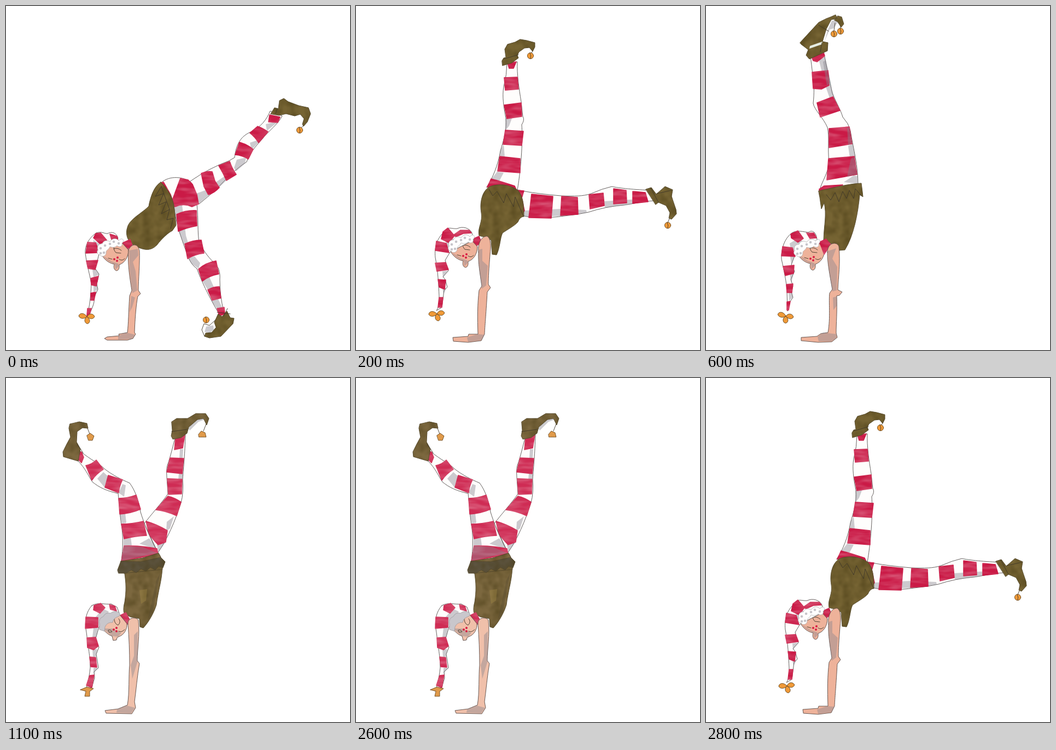
Animation of 629 by 629 pixels, one loop 3 s. Source, as an HTML page:

```html
<!DOCTYPE html>
<html lang="en">
<head>
<meta charset="utf-8">
<title>Elf handstand</title>
<style>
html, body { margin: 0; width: 100%; height: 100%; overflow: hidden; background: #fff; }
svg { display: block; width: 100%; height: 100%; }
path, circle { stroke-linejoin: round; stroke-linecap: round; }
.white { fill: #fefdfc; stroke: #55504f; stroke-width: .9; }
.red { fill: #ca1a46; stroke: #ca1a46; stroke-width: 1.6; filter: url(#streaks); }
.olive { fill: #766433; stroke: #574c31; stroke-width: .9; filter: url(#marker); }
.skin { fill: #eeb29a; stroke: #5b4c48; stroke-width: .9; }
.shade { fill: #85838e; fill-opacity: .42; }
.line { fill: none; stroke: #40382a; stroke-width: .9; }
.orange { fill: #f09a38; stroke: #6b4a20; stroke-width: .9; }
.pose { visibility: hidden; animation: 3s step-end infinite; }
#kick { animation-name: kick; }
#corner { animation-name: corner; }
#split { animation-name: split; }
#stand { animation-name: stand; }
#split .red { fill: #cf2c54; stroke: #cf2c54; }
#split .skin { fill: #f0c0aa; }
#split .olive { fill: #7c683f; }
#split .skirt { fill: #5d5440; }
#split .orange { fill: #e09a4a; }
@keyframes kick { 0% { visibility: visible } 6.666%, 100% { visibility: hidden } }
@keyframes corner {
  0% { visibility: hidden } 6.666% { visibility: visible }
  13.333% { visibility: hidden } 93.333%, 100% { visibility: visible }
}
@keyframes split {
  0% { visibility: hidden } 13.333% { visibility: visible } 20% { visibility: hidden }
  36.666% { visibility: visible } 53.333% { visibility: hidden }
  86.666% { visibility: visible } 93.333%, 100% { visibility: hidden }
}
@keyframes stand {
  0% { visibility: hidden } 20% { visibility: visible } 36.666% { visibility: hidden }
  53.333% { visibility: visible } 86.666%, 100% { visibility: hidden }
}
</style>
</head>
<body>
<svg viewBox="0 0 629 629">
<defs>
  <filter id="marker" x="-5%" y="-5%" width="110%" height="110%" color-interpolation-filters="sRGB">
    <feTurbulence type="fractalNoise" baseFrequency=".06" numOctaves="2" seed="4"/>
    <feColorMatrix values="0 0 0 0 .28  0 0 0 0 .23  0 0 0 0 .08  1 0 0 0 -.3"/>
    <feComposite in2="SourceGraphic" operator="in" result="mottle"/>
    <feMerge><feMergeNode in="SourceGraphic"/><feMergeNode in="mottle"/></feMerge>
  </filter>
  <filter id="streaks" x="-5%" y="-5%" width="110%" height="110%" color-interpolation-filters="sRGB">
    <feTurbulence type="fractalNoise" baseFrequency=".03 .12" numOctaves="2" seed="7"/>
    <feColorMatrix values="0 0 0 0 1  0 0 0 0 1  0 0 0 0 1  .5 0 0 0 -.18"/>
    <feComposite in2="SourceGraphic" operator="in" result="pale"/>
    <feMerge><feMergeNode in="SourceGraphic"/><feMergeNode in="pale"/></feMerge>
  </filter>
  <g id="bell">
    <circle class="orange" r="5.6"/>
    <path class="line" d="M-1-5Q2 0 0 5"/>
  </g>
  <g id="pom">
    <path class="orange" d="M0 0C-5-8-14-7-15-1C-12 5-4 4 0 0C4-7 12-6 14 0C11 6 4 4 0 0C-6 4-5 12 1 13C7 11 6 4 0 0Z"/>
  </g>
  <g id="face">
    <path class="red" d="M211 434L227 427L231 438L219 447Z"/>
    <path class="skin" d="M175 455C181 466 191 471 198 472C196 478 198 484 203 484C208 482 207 475 207 473C217 470 224 459 224 446L213 434L190 437Z"/>
    <path class="shade" d="M178 457C184 466 195 470 199 472L200 482L207 475L205 471L193 467Z"/>
    <path class="line" d="M197 444Q204 441 211 447M187 461L194 463M207 463Q212 467 217 462M198 436Q195 445 201 451L210 452"/>
    <g fill="#d81f43"><circle cx="198" cy="463" r="2"/><circle cx="204" cy="460" r="2"/><circle cx="203" cy="466" r="2"/></g>
  </g>
  <g id="fur">
    <path fill="#fefefe" stroke="#aaa8a9" stroke-width=".7" d="M168 446C165 438 172 434 176 435C178 428 186 428 190 431C194 424 203 424 206 429C212 422 218 428 212 434C214 440 206 442 203 438C199 443 193 441 190 440C188 446 183 446 183 450C184 458 174 460 172 455C167 455 165 450 168 446Z"/>
    <path d="M173 443h.1M179 451h.1M181 438h.1M190 435h.1M197 431h.1M206 434h.1M173 452h.1" stroke="#c6c5ca" stroke-width="4.5"/>
  </g>
</defs>

<g id="kick" class="pose">
  <path class="white" d="M336 321Q372 296 408 283L418 277C420 258 426 240 446 231C466 222 477 207 483 192L505 201C498 216 480 228 468 244C455 258 445 270 440 285C420 298 403 315 385 335Q368 350 353 362Z"/>
  <path class="shade" d="M345 344L367 336L371 346L353 361ZM384 322L400 311L404 318L388 333ZM417 296L422 281L439 277L437 288L421 302ZM449 263L446 250L458 246L467 244ZM477 228L475 216L487 213L496 213Z"/>
  <path class="red" d="M357 306Q367 301 377 303L382 320L390 332Q381 342 370 345L362 330ZM389 292L409 284Q413 297 421 308L403 319Q397 305 389 292ZM427 249Q441 253 452 262L443 280Q432 273 419 272ZM446 232L460 220Q469 223 479 230L462 250Q455 239 446 232ZM482 199L501 203L497 213L480 212Z"/>
  <path class="olive" d="M484 197L491 186L498 188L500 173L508 169L516 175L535 182L553 186L557 197L551 212L544 220L542 216L545 206L538 198L528 201L512 197L500 200Z"/>
  <path class="line" d="M544 219L538 224M496 187L493 197"/>
  <use href="#bell" x="537" y="227"/>
  <path class="white" d="M283 324C295 311 321 310 338 322Q350 340 349 362C352 390 350 415 353 430C360 446 368 457 378 467C389 475 392 487 391 500Q391 530 398 558L389 562C370 530 356 500 349 480C338 473 333 460 328 445C320 423 310 395 307 365Z"/>
  <path class="shade" d="M308 367L322 364L329 420L333 433L326 437L314 409ZM332 460L345 458L355 470L352 480L339 471ZM358 501L372 496L381 516L369 519ZM375 538L388 536L396 553L387 555Z"/>
  <path class="red" d="M303 358C309 342 315 325 319 315L333 318L341 326L349 345L352 362L340 367Q325 360 309 367ZM284 323L288 322L301 345L304 354ZM312 381Q329 373 348 374L349 402Q332 405 315 412ZM327 435Q342 428 357 428L362 452Q345 454 332 462ZM352 481Q366 469 384 466L389 490Q372 493 359 503ZM369 519Q379 513 390 513L393 534L377 538ZM386 553L399 551L400 563L390 567Z"/>
  <path class="olive" d="M283 322C270 330 264 350 261 366C250 378 225 390 222 405C217 420 225 433 233 437C250 446 263 450 276 437C285 425 297 414 304 411L311 401L308 372C306 350 296 335 283 322Z"/>
  <path class="line" d="M284 330L273 348L288 343L279 364L293 358L284 380L299 372L294 391L306 388L301 407M284 330L299 372"/>
  <path class="olive" d="M381 578L388 563L395 568L404 558L410 570L417 571L415 581L393 604L372 607L363 604L365 598L376 597L384 588Z"/>
  <path class="line" d="M363 604L358 592L362 581L372 584L383 574M386 560L410 563M398 567L405 553"/>
  <path class="shade" d="M363 596L366 586L379 584L380 592L373 597Z"/>
  <use href="#bell" x="366" y="574"/>
  <use href="#face"/>
  <path class="white" d="M165 415C150 425 144 440 145 452C148 475 153 490 156 508C155 530 153 550 148 567H152C155 555 163 545 161 533L168 518L166 508L170 490L163 480L168 462L172 445L205 425C202 414 193 412 186 416C180 417 175 411 165 415Z"/>
  <path class="shade" d="M160 428L172 436L166 450L158 447ZM158 482L164 481L170 491L160 496ZM160 512L167 510V519L160 523Z"/>
  <path class="red" d="M164 416L173 415L184 428L172 435L160 424ZM190 417L203 421L205 430L193 427ZM149 432L164 433L171 451L146 452ZM147 466L168 465L163 482L150 480ZM155 498L169 494L165 512L156 510ZM155 525L164 523L161 538L155 538ZM149 553L156 553L152 567L148 566Z"/>
  <use href="#fur"/>
  <use href="#pom" x="148" y="568"/>
  <path class="skin" d="M224 446C222 470 226 495 230 520L226 530C224 560 224 580 222 597L206 600L207 603L185 605L180 608L185 611H222L232 608L237 600L235 597C236 570 238 545 241 531L246 526L242 520C242 500 245 470 244 448C242 434 230 433 224 446Z"/>
  <path class="shade" d="M225 447L241 444L242 456L232 468L237 485L240 520L231 525L226 482ZM229 530L236 533L231 550L226 560ZM205 603L220 597L236 601L230 609L205 610Z"/>
</g>

<g id="corner" class="pose">
  <path class="white" d="M239 331C250 315 260 290 264 265C270 245 276 225 274 205C270 185 267 165 270 148Q276 125 276 104L295 102C294 125 298 150 302 175L305 202Q309 208 303 217C305 240 303 290 295 337Z"/>
  <path class="shade" d="M273 205L286 203L280 219L273 228ZM264 264L270 253L272 276L263 275ZM258 303L270 305L262 320L248 316Z"/>
  <path class="red" d="M277 104L293 102L288 114L280 114ZM271 131L295 130L297 152L273 154ZM271 181L302 177L303 202L276 206ZM273 227L306 229L303 255L269 253ZM263 275L300 279L300 305L259 302ZM240 331L247 316L265 321L290 329L294 337Z"/>
  <path class="olive" d="M267 100L270 95L274 94L272 79L277 70L291 66L300 61L312 63L327 67V75L323 83L317 76L308 77L298 84L295 90L297 95L285 104L268 109Z"/>
  <path class="line" d="M323 82L321 86M270 97L297 89"/>
  <use href="#bell" x="319" y="91"/>
  <path class="white" d="M295 336C315 341 350 345 375 347C400 348 415 348 430 343Q450 334 468 330C480 333 510 336 542 337L545 356C520 358 505 362 490 364Q455 367 425 377C410 380 400 382 380 384C355 388 320 388 303 383Z"/>
  <path class="shade" d="M308 374L374 371L421 373L422 378L380 384L306 385ZM454 357L533 352V358L455 369Z"/>
  <path class="red" d="M296 337L307 338L303 351L308 374L304 382ZM321 344L360 348L357 388L316 387ZM376 348L405 350L406 381L374 383ZM426 345L452 342L454 365L428 371ZM471 334L494 337L495 360L471 362ZM506 339L529 341L534 358L506 361Z"/>
  <path class="olive" d="M530 335L540 332L549 344L565 330L579 336L577 348L585 372L586 380L577 390L572 388L574 378L567 365L553 359L548 363Z"/>
  <path class="line" d="M539 333L553 359M573 389L570 396M550 343L577 337"/>
  <use href="#bell" x="570" y="401"/>
  <path class="olive" d="M243 331C230 340 226 360 229 378C232 395 222 405 225 420L237 423L247 428L249 454L257 455C264 440 263 425 268 415C278 408 290 402 296 395Q300 385 307 385C307 360 305 350 297 338C280 324 255 325 243 331Z"/>
  <path class="line" d="M243 335L250 347L258 339L270 360L275 343L288 367L291 349L306 384"/>
  <use href="#face" x="-2" y="-6"/>
  <path class="white" d="M162 412C148 425 143 440 145 460C150 485 151 510 152 530C152 545 150 553 147 557L157 551L161 520L167 514L163 500L159 495L169 484L163 465L172 450L215 428L212 415C208 406 195 402 185 407C175 408 167 402 162 412Z"/>
  <path class="shade" d="M164 432L175 424L182 429L168 446ZM158 485L168 484L159 497ZM158 516L166 515L160 527Z"/>
  <path class="red" d="M159 413L168 406L180 420L170 433L156 426ZM178 419L191 410L207 410L211 415L196 416L183 422ZM147 430L165 434L170 451L145 447ZM145 470L164 469L169 482L148 485ZM150 500L164 501L162 518L152 514ZM152 533L159 533L157 551L150 551Z"/>
  <use href="#fur" x="2" y="-7"/>
  <use href="#pom" x="148" y="563" transform="rotate(-8 148 563)"/>
  <path class="skin" d="M224 450C222 430 232 420 240 421C247 425 247 440 245 455C243 480 242 495 242 509L246 515L240 523C238 560 236 580 235 600L229 612L205 615L178 613L177 606L205 604L206 600L223 600C222 570 222 545 225 520L230 512C227 490 223 470 224 450Z"/>
  <path class="shade" d="M224 446L231 444L231 466L241 475L238 511L230 517L225 477ZM203 606L222 600L235 601L229 611L205 614Z"/>
</g>

<g id="split" class="pose">
  <path class="white" d="M253 266C265 250 285 228 296 212C295 190 292 170 295 160C302 140 306 120 310 107L328 104C327 140 325 160 323 185Q325 210 320 228C310 260 295 295 278 319Z"/>
  <path class="shade" d="M318 130L324 130L323 147L317 147ZM316 174L323 175V186L315 186ZM294 263L307 253L300 275L293 280ZM276 305L292 300L279 318Z"/>
  <path class="red" d="M310 110L327 104L323 128L308 131ZM300 146L325 147L322 175L294 172ZM295 184L322 185L321 212L297 213ZM296 216Q309 219 320 227L312 252Q293 243 274 241ZM256 262Q275 267 295 279L292 300L278 305L262 287Z"/>
  <path class="white" d="M136 134C155 150 172 157 180 166C195 178 212 186 226 192C236 205 243 225 246 245C252 265 262 290 278 320L211 334C214 310 214 295 212 275C208 250 207 230 205 211C185 207 170 200 158 190C150 178 145 165 132 152Z"/>
  <path class="shade" d="M167 184L178 172L187 180L181 201ZM206 210L213 194L219 196L216 217ZM208 249L218 247L220 265L212 266ZM215 293L228 291L230 306L215 307ZM244 303L262 293L276 313Z"/>
  <path class="red" d="M132 138L138 135L142 145L138 155L133 150ZM146 160Q157 158 165 150L178 167Q165 175 157 187ZM187 178L213 186Q207 198 206 210L181 200ZM206 220Q222 220 238 214L246 240Q227 248 208 249ZM211 267Q230 267 251 262L257 288Q237 289 216 294ZM216 307Q246 306 276 312L278 322L211 335Z"/>
  <path class="shade" d="M216 307L250 309L276 320L211 334Z"/>
  <path class="olive" d="M117 84L134 80L148 83L150 92L140 91L130 98L129 117L136 130L132 152L105 144L104 135L111 121L118 108L115 92Z"/>
  <path class="line" d="M149 92L153 102M130 120L141 137"/>
  <path class="orange" d="M148 105L154 101L161 106L158 114L151 114Z"/>
  <path class="shade" d="M333 92L348 77L362 72L366 75L352 80L336 96Z"/>
  <path class="olive" d="M303 80L312 74L332 74L347 65L365 65L371 74L367 86L361 74L350 76L334 90L331 101L320 109L305 112L302 106L304 96Z"/>
  <path class="line" d="M366 84L361 97M303 98L331 94"/>
  <path class="orange" d="M352 103L357 97L364 100L366 108L353 108Z"/>
  <path class="olive" d="M216 352C220 375 220 390 217 410C213 425 216 430 217 432L228 437L244 440L245 455L251 457C262 445 270 430 275 415C278 390 285 370 286 346Z"/>
  <path fill="#a28a45" fill-opacity=".4" d="M244 388L258 386L256 407L247 413Z"/>
  <path fill="#4c432c" fill-opacity=".3" d="M282 356L277 380L268 431L259 444L275 370Z"/>
  <path class="olive" d="M210 335L250 329L279 320L283 327L286 350L216 357Z"/>
  <path class="olive skirt" d="M204 351L210 335L246 336L283 328L291 336L287 347L279 344L273 351L264 346L256 353L247 349L238 356L229 351L219 357L206 357Z"/>
  <path class="red" d="M209 434L219 429L226 442L219 454Z"/>
  <path class="skin" d="M175 457C182 465 188 470 194 472L196 480L202 479Q202 474 206 473C216 470 222 459 221 449L208 433L193 440Z"/>
  <path class="shade" d="M177 458L194 458L211 466L205 473L194 472Z"/>
  <path class="line" d="M187 461Q191 459 194 464L189 465ZM198 438Q197 449 205 452Q211 446 206 440M206 463Q211 466 217 460"/>
  <g fill="#d81f43"><circle cx="202" cy="457" r="2"/><circle cx="197" cy="460" r="2"/><circle cx="202" cy="463" r="2"/></g>
  <path class="white" d="M157 416C146 428 143 445 147 465C150 490 154 510 154 530C152 550 148 560 147 567L157 566L162 548L161 537L169 530L165 505L170 492L163 480L170 455L207 430L203 419L192 413C180 415 170 409 157 416Z"/>
  <path class="shade" d="M163 438L177 422L188 427L170 455ZM160 457L168 457L165 474H158ZM158 496L167 496L164 511L159 510ZM160 530L168 530L160 541Z"/>
  <path class="red" d="M161 416L173 412L181 420L172 430L160 424ZM189 414L199 417L202 426L191 423ZM146 437L168 438L168 456L145 458ZM148 475L164 474L169 490L160 497L149 493ZM153 510L164 511L166 529L155 528ZM153 544L161 543L157 566L147 562Z"/>
  <path fill="#c9c7cc" stroke="#99969b" stroke-width=".7" d="M171 450Q168 440 178 436Q182 428 191 430Q199 424 207 429Q211 435 203 437Q196 440 195 447Q185 446 181 455L180 463L171 460Z"/>
  <path class="orange" d="M136 570L148 565L160 568L153 573V582H144L146 573Z"/>
  <path class="skin" d="M223 450C222 436 240 437 242 443C245 470 240 495 240 517L244 522C240 545 238 570 235 592L237 603L230 614L183 613L181 608L205 605L222 598C226 575 224 545 226 525C226 500 225 475 223 450Z"/>
  <path class="shade" d="M234 470L241 463L240 520L231 550L228 525L234 508ZM203 606L221 599L236 603L229 613L202 612Z"/>
</g>

<g id="stand" class="pose">
  <path class="white" d="M208 336C212 320 224 305 225 285C222 260 226 240 222 222C215 205 198 190 196 178C198 160 198 140 195 125L191 92L215 82C220 110 226 135 231 160C240 180 247 192 250 203L259 215L264 228C270 265 278 290 278 328Z"/>
  <path class="shade" d="M206 97L216 88L224 119L230 152L236 170L226 168L218 145ZM260 256L268 252L273 277L263 278ZM252 322L270 310L277 311V325Z"/>
  <path class="red" d="M192 90L214 83L217 91L203 102L196 100ZM194 121L223 118L225 145L211 152L196 151ZM203 177L232 166L245 191L209 203ZM225 224L262 221L267 252L225 259ZM224 279L271 275L276 308L221 318ZM207 335L216 329L250 327L208 346Z"/>
  <path class="shade" fill-opacity=".3" d="M258 223L262 222L267 251L260 255ZM265 279L271 276L276 308L258 312ZM214 102L219 99L226 143L221 145Z"/>
  <path class="shade" d="M222 45L230 27L241 25L248 36L240 31L233 41L226 43L217 64Z"/>
  <path class="olive" d="M172 67L206 30L220 23L228 20L237 16L240 23L229 25L220 42L213 65L223 67L222 82L189 97L183 90L187 80L174 70ZM241 18L248 20L252 33L247 39L241 29L235 26Z"/>
  <path fill="#e6ede2" d="M190 73L213 65L212 70L189 78Z"/>
  <path class="line" d="M236 31L234 45M246 36V41M206 35L224 46M209 84L212 67"/>
  <use href="#bell" x="234" y="51"/>
  <use href="#bell" x="246" y="46"/>
  <path class="olive" d="M206 338C230 333 260 325 284 324L287 349L281 345C278 380 270 420 254 446L242 447L240 437L227 434L215 428C216 400 221 380 216 360L211 371L208 350Z"/>
  <path class="line" d="M220 345L228 355L236 341L243 358L250 339L257 352L262 337L270 352L273 334L284 347"/>
  <use href="#face" x="-7" y="-1"/>
  <path class="red" d="M208 433L220 427L228 436L216 454L212 443Z"/>
  <path class="white" d="M157 415C143 425 137 445 138 463C143 485 147 505 148 520L149 558L154 540L159 533L156 522L159 512L155 500L162 485L156 473L164 452L203 428C202 412 193 409 187 414C180 413 165 409 157 415Z"/>
  <path class="shade" d="M153 434L170 424L176 430L163 447L155 444ZM154 458L162 457L156 473ZM153 490L160 489L156 506ZM151 525L157 524L159 532L152 539Z"/>
  <path class="red" d="M155 417L168 411L178 425L168 432L156 424ZM184 415L197 415L202 424L190 425ZM140 440L158 442L163 458L138 457ZM141 476L161 474L160 489L145 493ZM147 509L159 508L157 524L148 524ZM148 541L154 540L151 556H148Z"/>
  <use href="#fur" x="-6" y="1"/>
  <use href="#pom" x="146" y="567" transform="rotate(8 146 567)"/>
  <path class="skin" d="M222 450C222 432 240 430 243 440C246 470 242 495 241 519L249 523L244 529L239 530C240 560 238 580 238 598L240 606L230 614L205 615L174 612V606L203 604L210 599L223 597C228 570 224 540 226 525L231 518C226 490 222 470 222 450Z"/>
  <path class="shade" d="M223 448L238 443L231 462L240 477L239 520L231 522L225 484ZM232 533L239 531L239 548L233 556ZM204 605L214 597L239 600L238 608L229 613L206 613Z"/>
</g>
</svg>
</body>
</html>
```
